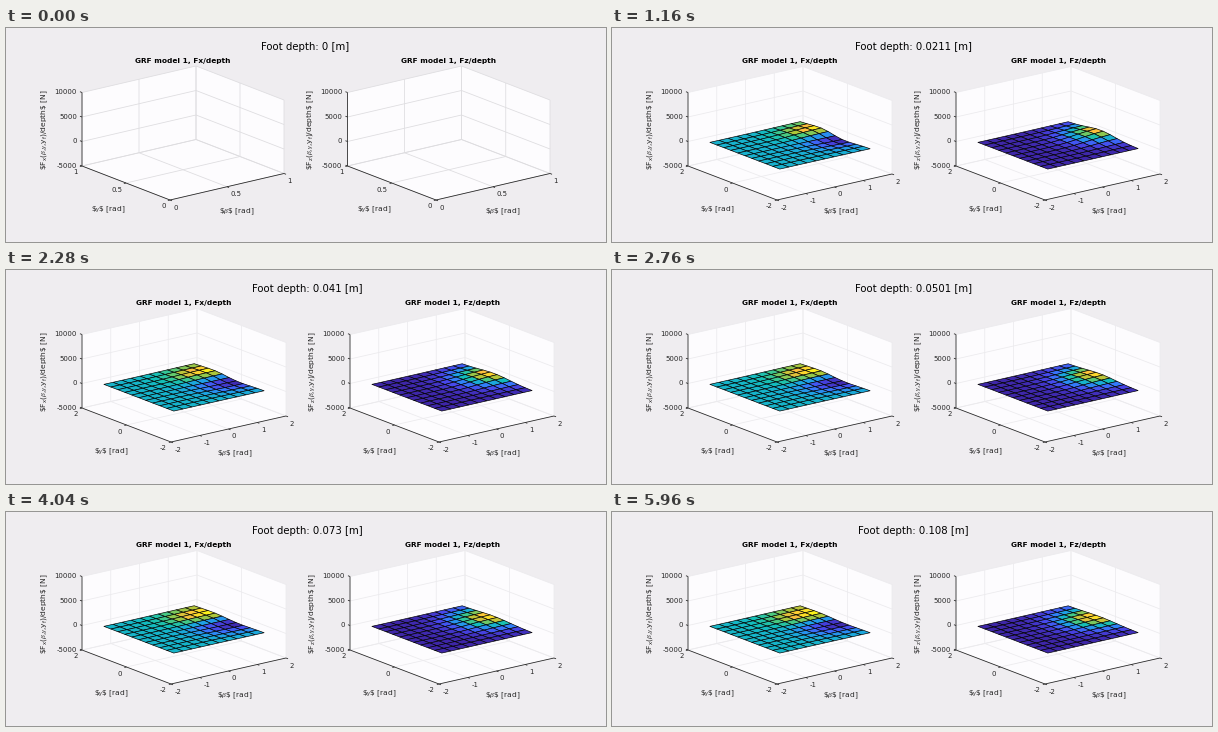
A matplotlib script that plays this animation: 600x214 px, repeating every 6 s.

```python
import numpy as np
import matplotlib.pyplot as plt
from matplotlib.animation import FuncAnimation
from matplotlib.collections import LineCollection, PolyCollection
from matplotlib.colors import LinearSegmentedColormap

W, H, DPI = 600, 214, 100
FRAMES, INTERVAL = 150, 40
PT = 72 / DPI  # points per pixel
INK = "#262626"
Z_LO, Z_HI = -5000, 10000
Z_PX = 73.5 / (Z_HI - Z_LO)

PARULA = LinearSegmentedColormap.from_list("parula", [
    (.242, .150, .660), (.281, .278, .922), (.215, .468, .990),
    (.120, .630, .900), (.070, .745, .726), (.300, .790, .490),
    (.690, .775, .220), (.995, .745, .240), (.977, .984, .080)])

plt.rcParams.update({
    "font.family": "DejaVu Sans",
    "mathtext.fontset": "custom",
    "mathtext.rm": "DejaVu Sans",
    "mathtext.it": "Liberation Serif:italic"})

fig = plt.figure(figsize=(W / DPI, H / DPI), dpi=DPI, facecolor="#efedf0")
ax = fig.add_axes([0, 0, 1, 1])
ax.set_xlim(0, W)
ax.set_ylim(H, 0)
ax.axis("off")


def text(x, y, s, size, ha="center", **kw):
    return ax.text(x, y, s, fontsize=size * PT, ha=ha,
                   va="center_baseline" if "rotation" not in kw else "center",
                   color=kw.pop("color", INK), **kw)


class Box:
    """Orthographic 3D axes box mapped straight to pixels."""

    def __init__(self, front, right, left, lo, hi, grid):
        self.front = np.array(front, float)
        self.u = np.array(right) - self.front
        self.v = np.array(left) - self.front
        self.lo, self.hi, self.grid = lo, hi, grid

    def at(self, x, y, z=Z_LO):
        span = self.hi - self.lo
        a = (np.asarray(x, float) - self.lo)[..., None] / span
        b = (np.asarray(y, float) - self.lo)[..., None] / span
        p = self.front + a * self.u + b * self.v
        p[..., 1] -= (np.asarray(z, float) - Z_LO) * Z_PX
        return p

    def draw(self, xticks, yticks, name, title_x, zlabel_x, xlabel_x, ylabel_x):
        lo, hi, at = self.lo, self.hi, self.at
        zticks = range(Z_LO, Z_HI + 1, 5000)
        walls = [
            [at(lo, lo), at(hi, lo), at(hi, hi), at(lo, hi)],
            [at(lo, hi), at(hi, hi), at(hi, hi, Z_HI), at(lo, hi, Z_HI)],
            [at(hi, lo), at(hi, hi), at(hi, hi, Z_HI), at(hi, lo, Z_HI)]]
        art = [PolyCollection(walls, facecolor="#fdfcfe", edgecolor="none", zorder=0)]

        grid = [[at(x, lo), at(x, hi), at(x, hi, Z_HI)] for x in xticks]
        grid += [[at(lo, y), at(hi, y), at(hi, y, Z_HI)] for y in yticks]
        grid += [[at(lo, hi, z), at(hi, hi, z), at(hi, lo, z)] for z in zticks]
        art.append(LineCollection(grid, colors=self.grid, linewidths=.8 * PT, zorder=1))

        du = self.u / np.hypot(*self.u) * 2.2
        dv = self.v / np.hypot(*self.v) * 2.2
        ink = [[at(lo, hi, Z_HI), at(lo, hi), at(lo, lo), at(hi, lo)]]
        ink += [[at(x, lo), at(x, lo) - dv] for x in xticks]
        ink += [[at(lo, y), at(lo, y) - du] for y in yticks]
        ink += [[at(lo, hi, z), at(lo, hi, z) + dv] for z in zticks]
        art.append(LineCollection(ink, colors=INK, linewidths=.8 * PT, zorder=2))
        for a in art:
            ax.add_collection(a)

        for x in xticks:
            px, py = at(x, lo)
            art.append(text(px + 3.5, py + 7, f"{x:g}", 6.9, "left"))
        for y in yticks:
            px, py = at(lo, y)
            art.append(text(px - 4, py + 6, f"{y:g}", 6.9, "right"))
        for z in zticks:
            px, py = at(lo, hi, z)
            art.append(text(px - 5, py - 1, f"{z}", 6.9, "right"))

        art.append(text(title_x, 32.7, f"GRF model 1, F{name}/depth", 7.4,
                        weight="bold", color="black"))
        zlabel = (r"\$$\mathrm{F_%s}$($\beta$,$\gamma$,$\mathrm{y_f}$)/depth\$ [N]" % name)
        art.append(text(zlabel_x, 101.5, zlabel, 7.5, rotation=90))
        art.append(text(xlabel_x, 182, r"\$$\beta$\$ [rad]", 7.5))
        art.append(text(ylabel_x, 180, r"\$$\gamma$\$ [rad]", 7.5))
        return art


# Empty unit axes, shown only before the first data arrives
unit = ((0, .5, 1), (0, .5, 1))
empty = Box((164, 172), (278, 145.5), (76, 138), 0, 1, "#dedde0").draw(
    *unit, "x", 176.5, 39, 231, 102)
empty += Box((430, 172), (544, 145.5), (341.5, 138), 0, 1, "#dedde0").draw(
    *unit, "z", 442.5, 305, 497, 368)

# Axes that hold the surfaces
wide = ((-2, -1, 0, 1, 2), (-2, 0, 2))
box_x = Box((165, 172), (280, 146), (76, 138), -2, 2, "#ecebee")
box_z = Box((433, 172), (548, 146), (344, 138), -2, 2, "#ecebee")
full = box_x.draw(*wide, "x", 177.5, 39, 228.5, 105)
full += box_z.draw(*wide, "z", 446.5, 307, 496.5, 373)

angle = np.linspace(-np.pi / 2, np.pi / 2, 11)
B, G = np.meshgrid(angle, angle)


def add_surface():
    mesh = PolyCollection([], edgecolors="black", linewidths=.65 * PT, zorder=5)
    ax.add_collection(mesh)
    return mesh


def set_surface(mesh, box, z):
    p = box.at(B, G, z)
    quads = np.stack([p[:-1, :-1], p[:-1, 1:], p[1:, 1:], p[1:, :-1]], axis=2)
    shade = (z - z.min()) / (z.max() - z.min())
    # Reversed so that far cells are painted first
    mesh.set_verts(quads.reshape(-1, 4, 2)[::-1])
    mesh.set_facecolor(PARULA(shade[:-1, :-1].ravel()[::-1]))


def ramp(start):
    return 1 / (1 + np.exp(-3 * (B - start)))


def forces(k):
    """Force per depth (Fx, Fz) over the angle grid at depth step k."""
    t = 1 - np.exp(-k / 45)
    size = 2100 * (11 / k) ** .7
    start = .95 - .65 * t
    s = (G - .1) / (.7 + .2 * t)
    wave = np.sqrt(2) * s * np.exp(.5 - s ** 2)
    fx = .45 * size * ramp(start) * np.where(wave < 0, .85, 1) * wave

    s = (G - .1) / (.75 + .2 * t)
    fz = size * ramp(start + .2) * np.exp(-s ** 2)
    return fx, fz


surf_x, surf_z = add_surface(), add_surface()
heading = text(299, 18.3, "", 10.1, color="black")


def update(i):
    k = round(1.2 * i)
    heading.set_text(f"Foot depth: {k * .12 / 199:.3g} [m]")
    heading.set_x(301.5 if i else 299)
    for a in empty:
        a.set_visible(i == 0)
    for a in full + [surf_x, surf_z]:
        a.set_visible(i > 0)
    if i:
        fx, fz = forces(k)
        set_surface(surf_x, box_x, fx)
        set_surface(surf_z, box_z, fz)
    return [heading, surf_x, surf_z]


anim = FuncAnimation(fig, update, frames=FRAMES, interval=INTERVAL,
                     repeat=True, repeat_delay=0, blit=False)
plt.show()
```
